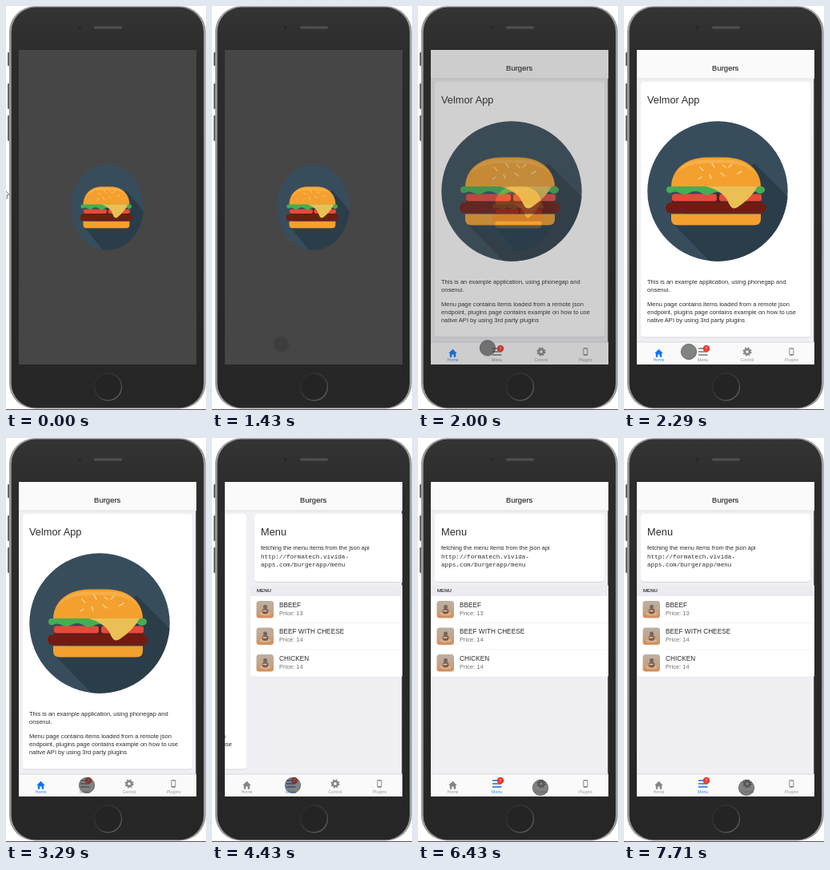
Write an HTML page that moves like this. It is 250 px wide and 506 px high and loops after 8000 ms.

```html
<!DOCTYPE html>
<html lang="en">
<head>
<meta charset="utf-8">
<title>Burgers</title>
<style>
  html, body { margin: 0; width: 100%; height: 100%; overflow: hidden; background: #fff; }
  svg { display: block; width: 100vw; height: 100vh; }
  text { font-family: "Liberation Sans", Arial, sans-serif; fill: #2c2c2c; }
  .title { font-size: 9.5px; text-anchor: middle; stroke: #2c2c2c; stroke-width: .15px; }
  .head { font-size: 12.8px; }
  .body { font-size: 7.43px; }
  .body.wide { font-size: 7.55px; }
  .mono { font-family: "Liberation Mono", "Courier New", monospace; font-size: 7.65px; }
  .section { font-size: 6.1px; stroke: #2c2c2c; stroke-width: .15px; }
  .item { font-size: 8.25px; }
  .price { font-size: 7.5px; fill: #707070; }
  .tab { color: #858585; }
  .tab text { font-size: 5.3px; text-anchor: middle; fill: currentColor; fill-opacity: .8; }
  .tab .count { font-size: 6px; fill: #fff; }

  .splash, .pages, .tab.home, .tab.menu, .pointer, .arrow {
    animation: 8s -3ms infinite step-end;
  }
  .splash { animation-name: fade; }
  .pages { animation-name: slide; }
  .tab.home { animation-name: leave; }
  .tab.menu { animation-name: enter; }
  .pointer { animation-name: point; }
  .arrow { animation-name: arrow; }

  @keyframes fade {
    0% { opacity: 1; }
    19.643% { opacity: 1; animation-timing-function: steps(4); }
    26.786%, 100% { opacity: 0; }
  }
  @keyframes slide {
    0% { transform: translateX(0); }
    55.357% { transform: translateX(-190px); }
    57.143% { transform: translateX(-220px); }
    58.929%, 100% { transform: translateX(-222px); }
  }
  @keyframes leave {
    0% { color: #1075f5; }
    55.357%, 100% { color: #858585; }
  }
  @keyframes enter {
    0% { color: #777; }
    55.357%, 100% { color: #1a6ae0; }
  }
  @keyframes point {
    0% { transform: translate(-12px, 235px); animation-timing-function: steps(8); }
    14.286% { transform: translate(84px, 422px); animation-timing-function: steps(5); }
    23.214% { transform: translate(90px, 426px); animation-timing-function: steps(3); }
    28.571% { transform: translate(81px, 433px); }
    32.143% { transform: translate(81px, 433px); animation-timing-function: steps(4); }
    39.286% { transform: translate(101px, 435px); }
    69.643% { transform: translate(101px, 435px); animation-timing-function: steps(6); }
    80.357%, 100% { transform: translate(153px, 438px); }
  }
  @keyframes arrow {
    0% { opacity: 1; }
    1.786%, 100% { opacity: 0; }
  }
</style>
</head>
<body>
<svg viewBox="0 0 250 506" preserveAspectRatio="none">
  <defs>
    <linearGradient id="shell" x2="0" y2="1">
      <stop stop-color="#343434"/>
      <stop offset=".12" stop-color="#2c2c2c"/>
      <stop offset="1" stop-color="#262626"/>
    </linearGradient>
    <linearGradient id="ring" x2="1" y2="1">
      <stop stop-color="#272727"/>
      <stop offset=".5" stop-color="#3a3a3a"/>
      <stop offset="1" stop-color="#6a6a6a"/>
    </linearGradient>
    <linearGradient id="photo" x2="0" y2="1">
      <stop stop-color="#bdb0a2"/>
      <stop offset=".55" stop-color="#c2a48a"/>
      <stop offset="1" stop-color="#d58d55"/>
    </linearGradient>
    <clipPath id="screen"><rect x="16" y="55.3" width="221.3" height="392.9"/></clipPath>
    <clipPath id="plate"><circle cx="117" cy="232" r="87.7"/></clipPath>

    <g id="burger">
      <circle cx="117" cy="232" r="87.7" fill="#384d5c"/>
      <path d="M163 197L263 297V372H157L60 271Z" fill="#2c3d4a" clip-path="url(#plate)"/>
      <path d="M59 227C59 203 80 189.5 104 189.5H126C150 189.5 171 203 171 227Z" fill="#f3a02f"/>
      <path d="M66 209C73 197 88 192 104 192H126C142 192 157 197 164 209C154 200 142 197 126 197H104C88 197 76 200 66 209Z" fill="#f7ae46"/>
      <path d="M95 202l4 4M110 197l3 5M121 209l5 4M93 217l4-3M135 198l-4 4M147 207l-5 3M123 199l4 3M107 211l2 5"
            stroke="#fbd08a" stroke-width="1.5" stroke-linecap="round"/>
      <rect x="60" y="236" width="111" height="11" fill="#4d211d"/>
      <rect x="60" y="235.5" width="56" height="9" rx="3" fill="#e54a3a"/>
      <rect x="119" y="235.5" width="53" height="9" rx="3" fill="#e54a3a"/>
      <path d="M57 226H173Q178 229 175 233Q170 237 165 233Q160 230 154 234Q148 238 141 235H124Q117 231 110 235Q103 239 96 234Q89 230 82 234Q75 238 69 234Q63 231 59 234Q53 235 53 230Q53 226 57 226Z" fill="#45ad52"/>
      <rect x="52" y="246" width="125.5" height="13.5" rx="6.5" fill="#711b13"/>
      <path d="M59 260.5H171V267Q171 274.5 163 274.5H67Q59 274.5 59 267Z" fill="#f3a02f"/>
      <path d="M103 226H167Q159 241 142 252Q135 256.500 131 247Q125 232 103 226Z" fill="#eac055"/>
    </g>

    <g id="avatar">
      <rect width="21.5" height="21.5" rx="3.5" fill="url(#photo)"/>
      <ellipse cx="11" cy="16" rx="7" ry="2.5" fill="#d9b592"/>
      <ellipse cx="11" cy="13" rx="4" ry="3.5" fill="#7d5a49"/>
      <circle cx="11" cy="7.500" r="2.5" fill="#71675f"/>
      <path d="M8 12.500H13" stroke="#dccdb9" stroke-width="1.5"/>
    </g>
  </defs>

  <!-- phone -->
  <rect width="250" height="506" fill="#fff"/>
  <path d="M0 505.5H250" stroke="#555"/>
  <g fill="#666">
    <rect x="2" y="58" width="3" height="17" rx="1"/>
    <rect x="2" y="97" width="3" height="32" rx="1"/>
    <rect x="2" y="137" width="3" height="32" rx="1"/>
  </g>
  <rect x="4" y=".3" width="245.7" height="504.2" rx="32" fill="#9a9a9a"/>
  <rect x="6.7" y="1.6" width="240.3" height="501.6" rx="30.5" fill="url(#shell)"/>
  <circle cx="92" cy="27" r="1.8" fill="#20242a"/>
  <rect x="110" y="25.5" width="35" height="3" rx="1.5" fill="#505050"/>
  <circle cx="127.5" cy="477" r="17" fill="#242424" stroke="url(#ring)" stroke-width="1.3"/>

  <g clip-path="url(#screen)">
    <rect x="16" y="55" width="222" height="394" fill="#efeff4"/>

    <g class="pages">
      <g>
        <rect x="21" y="95.5" width="212" height="320" rx="4" fill="#d8d8dc"/>
        <rect x="21" y="95" width="212" height="319.5" rx="4" fill="#fff"/>
        <text class="head" x="29" y="122">Velmor App</text>
        <use href="#burger"/>
        <text class="body wide">
          <tspan x="29" y="348">This is an example application, using phonegap and</tspan>
          <tspan x="29" y="358">onsenui.</tspan>
          <tspan x="29" y="376">Menu page contains items loaded from a remote json</tspan>
          <tspan x="29" y="386">endpoint, plugins page contains example on how to use</tspan>
          <tspan x="29" y="396">native API by using 3rd party plugins</tspan>
        </text>
      </g>

      <g transform="translate(222)">
        <rect x="21" y="95.5" width="212" height="85.5" rx="4" fill="#d8d8dc"/>
        <rect x="21" y="95" width="212" height="85" rx="4" fill="#fff"/>
        <text class="head" x="29" y="122">Menu</text>
        <text class="body" x="29" y="139.8">fetching the menu items from the json api</text>
        <text class="mono"><tspan x="29" y="151">http://formatech.vivida-</tspan><tspan x="29" y="161">apps.com/burgerapp/menu</tspan></text>
        <rect x="16" y="184.5" width="222" height="13.5" fill="#ececf0"/>
        <text class="section" x="24" y="193.2">MENU</text>
        <rect x="16" y="198" width="222" height="100.5" fill="#fff"/>
        <path d="M52 231.5H238M52 265H238" stroke="#eee" stroke-width=".7"/>
        <use href="#avatar" x="23.5" y="204"/>
        <text class="item" x="52" y="211.8">BBEEF</text>
        <text class="price" x="52" y="221.7">Price: 13</text>
        <use href="#avatar" x="23.5" y="237.5"/>
        <text class="item" x="52" y="245.4">BEEF WITH CHEESE</text>
        <text class="price" x="52" y="255.3">Price: 14</text>
        <use href="#avatar" x="23.5" y="271"/>
        <text class="item" x="52" y="279">CHICKEN</text>
        <text class="price" x="52" y="288.9">Price: 14</text>
      </g>
    </g>

    <!-- toolbar -->
    <rect x="16" y="55" width="222" height="36" fill="#fafafa"/>
    <path d="M16 91H238" stroke="#d5d5d8" stroke-width=".7"/>
    <text class="title" x="126.7" y="80.800">Burgers</text>

    <!-- tab bar -->
    <rect x="16" y="421" width="222" height="28" fill="#fafafa"/>
    <path d="M16 421H238" stroke="#ccc" stroke-width=".7"/>
    <g class="tab home">
      <path d="M43.5 429.8L48.7 435H47.2V439.8H44.700V436.5H42.3V439.8H39.8V435H38.3Z" fill="currentColor"/>
      <text x="43.5" y="445">Home</text>
    </g>
    <g class="tab menu">
      <path d="M93 429H104.5M93 433H104.5M93 437H104.5" stroke="currentColor" stroke-width="1.7"/>
      <text x="98.7" y="445">Menu</text>
      <circle cx="103" cy="429" r="4.3" fill="#f0392b"/>
      <text class="count" x="103" y="431.2">7</text>
    </g>
    <g class="tab">
      <circle cx="154" cy="433" r="3.1" fill="none" stroke="currentColor" stroke-width="2.5"/>
      <circle cx="154" cy="433" r="4.8" fill="none" stroke="currentColor" stroke-width="1.5" stroke-dasharray="2.1 1.67"/>
      <text x="154" y="445">Control</text>
    </g>
    <g class="tab">
      <rect x="206.8" y="428.6" width="5" height="8.8" rx="1" fill="none" stroke="currentColor" stroke-width=".9"/>
      <path d="M207 429H212M207 436.7H212" stroke="currentColor" stroke-width="1.2"/>
      <text x="209.5" y="445">Plugins</text>
    </g>

    <g class="splash">
      <rect x="16" y="55" width="222" height="394" fill="#464646"/>
      <use href="#burger" transform="translate(66 110.5) scale(.517 .611)"/>
    </g>
  </g>

  <path class="arrow" d="M-3 229L4 236L1 236.5L2 240L0 241L-3 237Z" fill="#fff" stroke="#555" stroke-width=".8"/>
  <g class="pointer">
    <circle r="9.7" fill="#383838" fill-opacity=".62" stroke="#444" stroke-opacity=".6"/>
  </g>
</svg>
</body>
</html>
```
